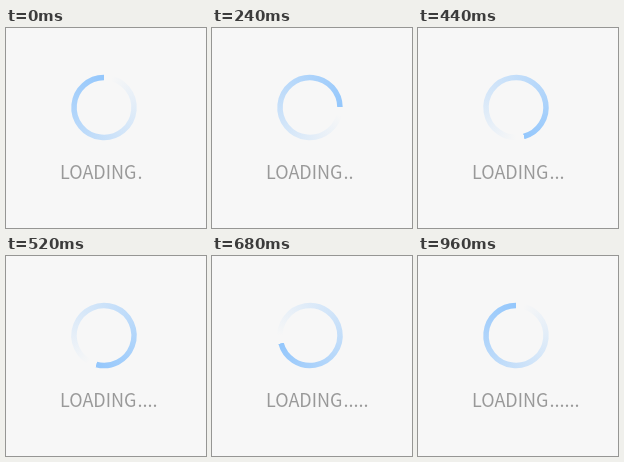
These frames come from a looping animation (200 px wide and 200 px high, 1000 ms). An HTML page with a canvas:

```html
<!DOCTYPE html>
<html lang="en">
<head>
<meta charset="utf-8">
<title>Loading</title>
<style>
  html, body { margin: 0; height: 100%; overflow: hidden; background: #f7f7f7; }
  canvas { display: block; }
</style>
</head>
<body>
<canvas id="stage" width="200" height="200"></canvas>
<script>
const ctx = document.getElementById('stage').getContext('2d');
const LOOP = 1000, STEP = 40, CX = 98, CY = 79.5, RADIUS = 30, WIDTH = 5.5;

function ring(head) {
  const fade = ctx.createConicGradient(head, CX, CY);
  fade.addColorStop(0, 'rgba(148, 199, 252, 0)');
  fade.addColorStop(0.04, 'rgba(148, 199, 252, 0)');
  fade.addColorStop(1, 'rgb(148, 199, 252)');
  ctx.strokeStyle = fade;
  ctx.lineWidth = WIDTH;
  ctx.beginPath();
  ctx.arc(CX, CY, RADIUS, head + 0.1, head + 2 * Math.PI);
  ctx.stroke();
}

function label(dots) {
  ctx.font = '18px "Noto Sans CJK SC", "Noto Sans CJK", "Noto Sans CJK JP", sans-serif';
  ctx.fillStyle = '#999';
  ctx.fillText('LOADING', 54, 151);
  ctx.fillText('.'.repeat(dots), 131.5, 151);
}

function draw(now) {
  const step = Math.floor(now % LOOP / STEP);
  ctx.fillStyle = '#f7f7f7';
  ctx.fillRect(0, 0, 200, 200);
  ring((step * 15 - 90) * Math.PI / 180);
  label(Math.min(6, 1 + Math.floor(step / 4)));
}

const start = performance.now();
function tick() {
  draw(performance.now() - start);
  requestAnimationFrame(tick);
}
tick();
</script>
</body>
</html>
```
